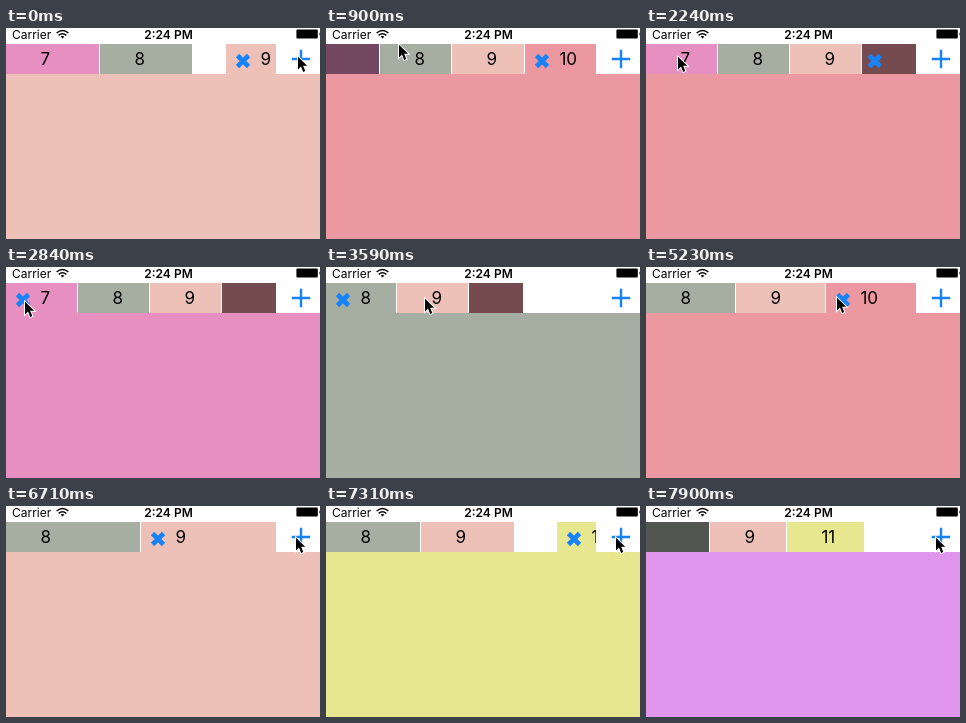
These frames come from a looping animation (314 px wide and 211 px high, 8 s). An HTML page:

```html
<!DOCTYPE html>
<html lang="en">
<head>
<meta charset="utf-8">
<title>Tab bar</title>
<style>
  html, body { margin: 0; width: 100%; height: 100%; overflow: hidden; background: #fff; }
  svg { display: block; width: 100vw; height: 100vh; }
  text { font-family: Inter, Roboto, sans-serif; }
  .status { font-size: 12px; }
  .label { font-size: 17px; }
  .blue { stroke: #1783fb; fill: none; }
</style>
</head>
<body>
<svg viewBox="0 0 314 211">
  <defs><clipPath id="bar"><rect y="16" width="270" height="30"/></clipPath></defs>
  <rect width="314" height="211" fill="#fff"/>
  <text class="status" x="6" y="10.5">Carrier</text>
  <g fill="none" stroke="#000" stroke-width="1.5">
    <path d="M50.6 5Q56.5 .2 62.4 5M52.7 7.3Q56.5 4.3 60.3 7.3"/>
    <path d="M54.6 8.6Q56.5 7.2 58.4 8.6L56.5 10.6Z" fill="#000" stroke="none"/>
  </g>
  <text class="status" x="162.5" y="10.5" text-anchor="middle" font-weight="600">2:24 PM</text>
  <rect x="290.4" y="1.6" width="21.4" height="8.8" rx="1"/>
  <path d="M313 4.2Q314.4 6 313 7.8Z"/>
  <rect id="page" y="46" width="314" height="165"/>
  <g id="tabs" clip-path="url(#bar)"></g>
  <path class="blue" d="M285.8 31H304.2M295 21.8V40.2" stroke-width="2.4"/>
  <path id="cursor" d="M1 1.8V14.4L4 11.6L6.2 16.9L8.3 16L6.1 10.8H10.2Z"
    stroke="#fff" stroke-width="2" paint-order="stroke"/>
</svg>
<script>
const LOOP = 8000, TICK = 149;
const COLORS = { 7: '#e78fc0', 8: '#a6ada1', 9: '#edc1b8', 10: '#ec98a1', 11: '#e6e78f', 12: '#e096ec' };

// Layouts: scroll offset, tab pitch, shift of the last tab, width of the last tab
const two = [0, 135, 0, 135], three = [0, 90, 0, 90], four = [-18, 72.2, 0, 72.2];
const scrolled = [0, 72, 0, 54], closed = [0, 71.4, 0, 54];
const entering = layout => [layout[0], layout[1], 410, layout[3]];

// Times are in ticks
const scenes = [
  { at: -2.56, dur: 4.5, ids: [7, 8, 9], sel: 9, from: entering(two), to: three },
  { at: 1.7, dur: 4.5, ids: [7, 8, 9, 10], sel: 10, from: entering(three), to: four },
  { at: 9.5, dur: 5, ids: [7, 8, 9, 10], sel: 10, from: four, to: scrolled },
  { at: 16, dur: 1, ids: [7, 8, 9, 10], sel: 7, from: scrolled, to: scrolled },
  { at: 20.6, dur: 3.2, ids: [8, 9, 10], sel: 8, from: [72, 72, 0, 54], to: closed },
  { at: 29.5, dur: 4.4, ids: [8, 9, 10], sel: 10, from: closed, to: three },
  { at: 37, dur: 1, ids: [8, 9], sel: 9, from: three, to: three },
  { at: 38.5, dur: 5.5, ids: [8, 9], sel: 9, from: three, to: two },
  { at: 46.6, dur: 4.5, ids: [8, 9, 11], sel: 11, from: entering(two), to: three },
  { at: 51.44, dur: 4.5, ids: [8, 9, 11, 12], sel: 12, from: entering(three), to: four }
];

// Pointer path: tick, x, y
const path = [
  [0, 291, 27], [3, 291, 28], [6, 72, 15], [7, 36, 25], [8, 35, 24], [9, 35, 24],
  [15, 31, 27], [17, 31, 27], [19, 18, 33], [21, 18, 33], [24, 98, 30], [26, 98, 30],
  [29, 165, 31], [32, 165, 31], [34, 201, 33], [35, 190, 29], [38, 190, 29],
  [45, 289, 30], [54, 289, 30]
];

const $ = id => document.getElementById(id);
const set = (el, attrs) => { for (const k in attrs) el.setAttribute(k, attrs[k]); };
const add = (tag, parent, attrs) => {
  const el = document.createElementNS('http://www.w3.org/2000/svg', tag);
  set(el, attrs);
  parent.append(el);
  return el;
};
const mix = (a, b, p) => a + (b - a) * p;
const easeOut = u => 1 - (1 - u) ** 3;

const slots = [0, 1, 2, 3].map(() => {
  const g = add('g', $('tabs'), {});
  return {
    g,
    back: add('rect', g, { y: 16, height: 30 }),
    shade: add('rect', g, { y: 16, height: 30, fill: '#000', opacity: .5 }),
    label: add('text', g, { class: 'label', y: 37.2 }),
    cross: add('path', g, { class: 'blue', d: 'M-5.5-5.5L5.5 5.5M5.5-5.5L-5.5 5.5', 'stroke-width': 4.6 })
  };
});

const show = (el, on) => set(el, { display: on ? 'inline' : 'none' });

function drawTabs(k) {
  const s = scenes.filter(c => c.at <= k).pop();
  const p = easeOut(Math.min(1, (k - s.at) / s.dur));
  const [off, pitch, shift, lastW] = s.from.map((v, i) => mix(v, s.to[i], p));
  set($('page'), { fill: COLORS[s.sel] });

  slots.forEach((slot, i) => {
    const id = s.ids[i], last = i === s.ids.length - 1;
    show(slot.g, id);
    if (!id) return;
    const x = Math.round(off + i * pitch + (last ? shift : 0));
    const end = last ? Math.round(x + lastW) : Math.round(off + (i + 1) * pitch) - 1;
    const dim = i === 0 && off < -1 || last && lastW < pitch - 1;
    const box = { x, width: Math.max(0, end - x) };
    set(slot.back, { ...box, fill: COLORS[id] });
    set(slot.shade, box);
    show(slot.shade, dim);
    slot.label.textContent = id;
    set(slot.label, { x: x + 34.4 });
    show(slot.label, !dim);
    const inset = last ? 17 * lastW / pitch : 17;
    set(slot.cross, { transform: `translate(${x + inset} 33)` });
    show(slot.cross, id === s.sel);
  });
}

function drawCursor(k) {
  const i = path.findIndex(q => q[0] > k);
  const a = path[i - 1], b = path[i];
  const p = (k - a[0]) / (b[0] - a[0]);
  set($('cursor'), { transform: `translate(${mix(a[1], b[1], p)} ${mix(a[2], b[2], p)})` });
}

function render(ms) {
  const k = Math.floor(ms % LOOP / TICK);
  drawTabs(k);
  drawCursor(k);
}

const start = performance.now();
function frame() {
  render(performance.now() - start);
  requestAnimationFrame(frame);
}
frame();
</script>
</body>
</html>
```
